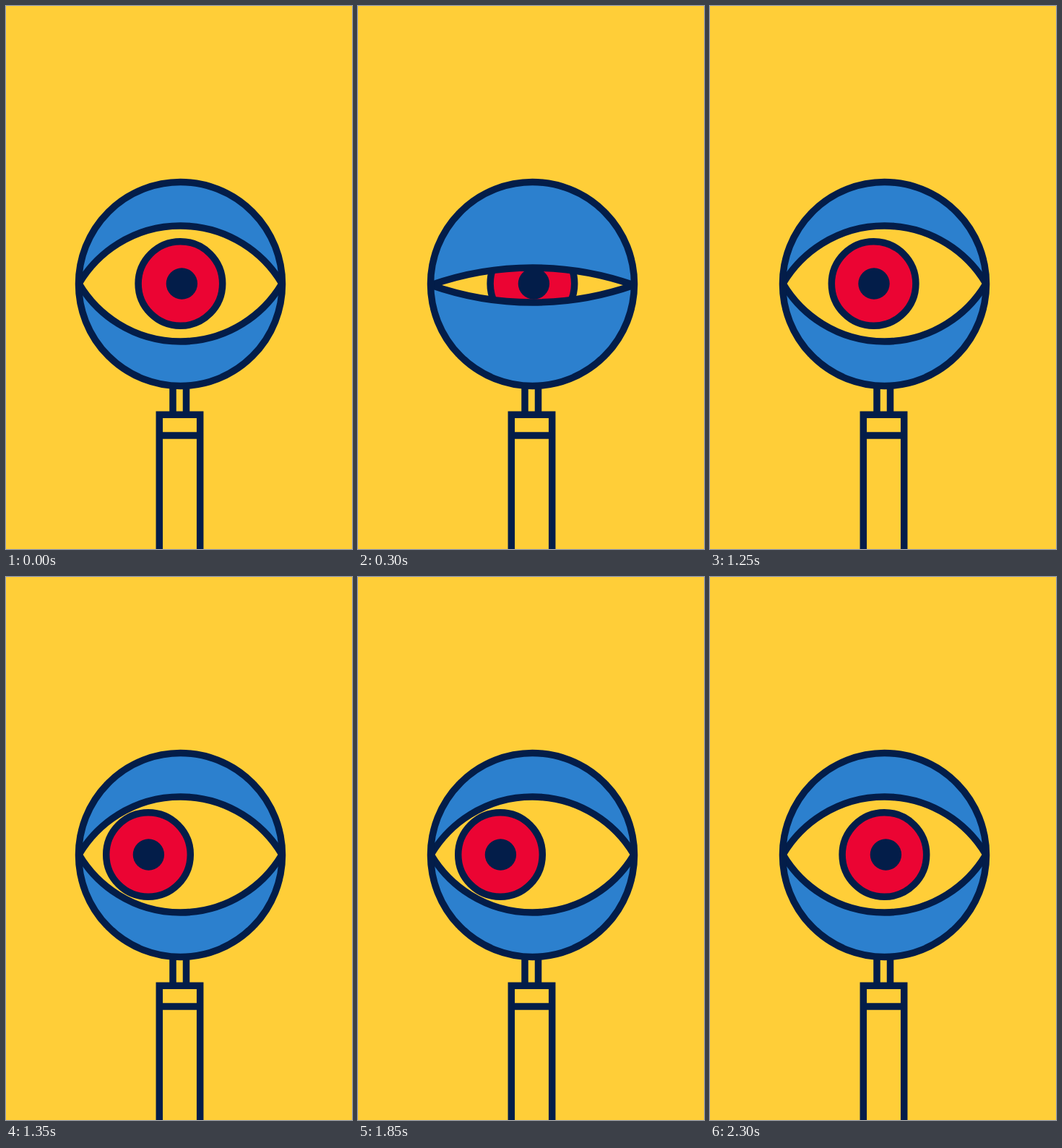
An HTML page for the animation above (2350 ms loop, 479 by 751 pixels).

```html
<!DOCTYPE html>
<html lang="en">
<head>
<meta charset="utf-8">
<title>Watching eye</title>
<style>
  html, body { margin: 0; width: 100%; height: 100%; overflow: hidden; background: #ffce38; }
  svg { display: block; width: 100%; height: 100%; }
  .line { fill: none; stroke: #031d49; stroke-width: 9.5; }
</style>
</head>
<body>
<svg viewBox="0 0 479 751">
  <defs>
    <clipPath id="ball"><circle cx="241.5" cy="384.5" r="141"/></clipPath>
    <clipPath id="opening"><path class="lens"/></clipPath>
  </defs>
  <rect width="479" height="751" fill="#ffce38"/>
  <path class="line" d="M231 526V561M249.5 526V561M212.3 760V565.2H268.7V760M212.3 594H268.7"/>
  <g clip-path="url(#ball)">
    <circle cx="241.5" cy="384.5" r="141" fill="#2c80ce"/>
    <path class="lens" fill="#ffce38"/>
    <g clip-path="url(#opening)">
      <circle id="iris" cy="384" r="58.3" class="line" style="fill:#eb0433"/>
      <circle id="pupil" cy="384" r="21.7" fill="#031d49"/>
    </g>
    <path class="lens line"/>
  </g>
  <circle class="line" cx="241.5" cy="384.5" r="141"/>
</svg>
<script>
  const LOOP = 2350, STEP = 50;
  const lenses = document.querySelectorAll('.lens');
  const iris = document.getElementById('iris');
  const pupil = document.getElementById('pupil');
  const clamp = (v, lo, hi) => Math.max(lo, Math.min(hi, v));

  // Two arcs meeting at the eye corners, each bulging by `rise`.
  function lensPath(rise, cy) {
    const half = 140.5, left = 241.5 - half, right = 241.5 + half;
    if (rise < 0.5) return `M${left} ${cy}H${right}Z`;
    const r = (half * half + rise * rise) / (2 * rise);
    return `M${left} ${cy}A${r} ${r} 0 0 1 ${right} ${cy}A${r} ${r} 0 0 1 ${left} ${cy}Z`;
  }

  function draw(ms) {
    const n = Math.floor((ms % LOOP) / STEP);
    const shut = clamp(3 - Math.abs(n - 5), 0, 3);
    const look = clamp(Math.min(n - 24, 46 - n), 0, 3);
    const d = lensPath(Math.max(0, 80 - 28 * shut), 384 + shut);
    lenses.forEach(el => el.setAttribute('d', d));
    const x = 241.4 - 14.8 * look;
    iris.setAttribute('cx', x);
    pupil.setAttribute('cx', look ? x + 0.4 : x + 2);
  }

  let start;
  function tick(now) {
    start ??= now;
    draw(now - start);
    requestAnimationFrame(tick);
  }
  draw(0);
  requestAnimationFrame(tick);
</script>
</body>
</html>
```
